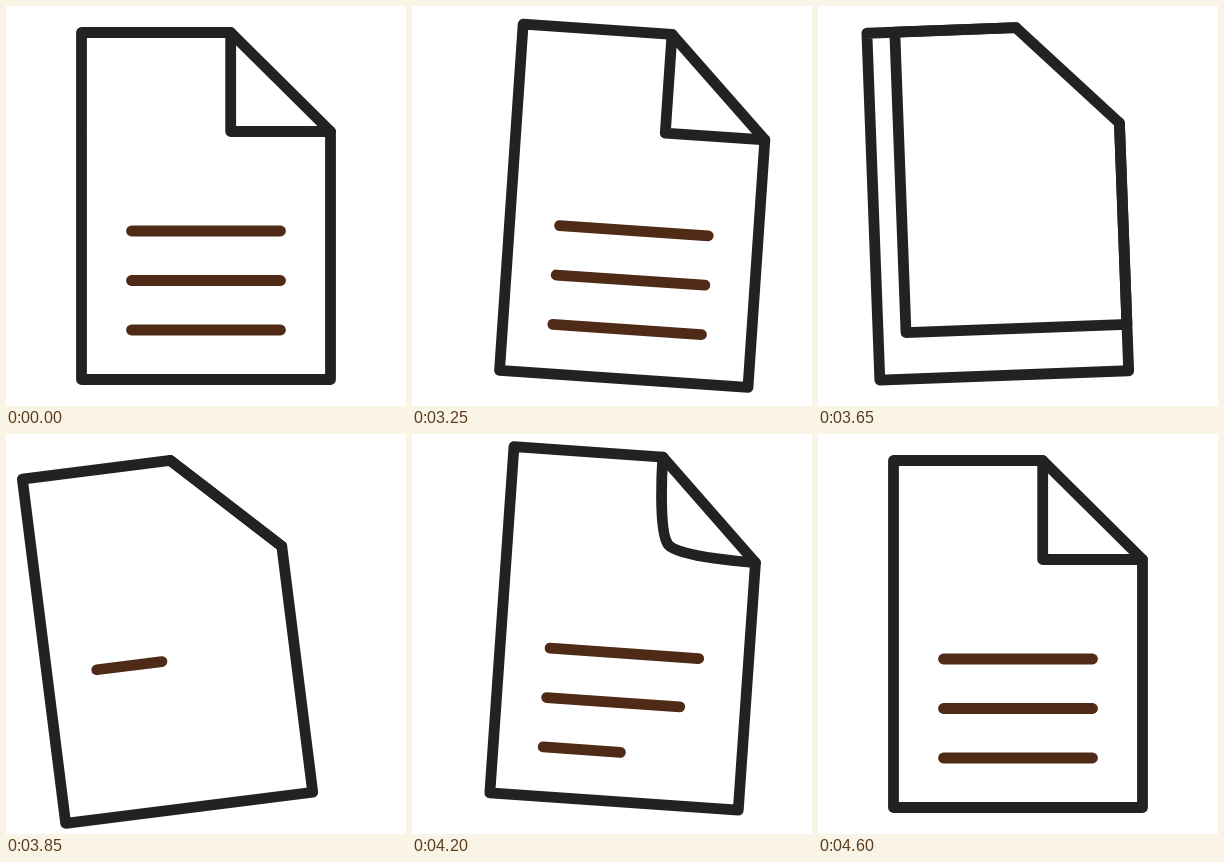
Write an HTML page with a canvas that moves like this. It is 400 px wide and 400 px high and loops after 4620 ms.

```html
<!DOCTYPE html>
<html lang="en">
<head>
<meta charset="utf-8">
<title>Page turn</title>
<style>
  html, body { margin: 0; width: 100%; height: 100%; overflow: hidden; background: #fff; }
  canvas { display: block; }
</style>
</head>
<body>
<canvas id="stage" width="400" height="400"></canvas>
<script>
const ctx = document.getElementById('stage').getContext('2d');
const LOOP = 4620, INK = '#222', BROWN = '#4e2a17';

// Page geometry, relative to the page centre
const L = -124.5, R = 124.5, T = -173.5, B = 173.5;
const FOLD_X = 24.7, FOLD_Y = -74.5;
const FLIP_START = 3420, FLIP_END = 3743;

// Page sway: time, x, y, degrees
const SWAY = [
  [3095, 0, 0, 0],
  [3440, 55, -1.2, 9.1],
  [3650, -20, -4, -2.1],
  [3865, -38.5, 1.7, -7.2],
  [4255, 17, -6, 4.6],
  [4595, 0, 0, 0]
];

const span = (t, from, to) => Math.min(1, Math.max(0, (t - from) / (to - from)));
const easeInOut = s => (1 - Math.cos(Math.PI * s)) / 2;
const easeOut = s => 1 - (1 - s) ** 2;
const mix = (a, b, s) => a + (b - a) * s;

// Slope at a key; flat at turning points and at both ends
function slope(i, c) {
  const p = SWAY[i - 1], k = SWAY[i], n = SWAY[i + 1];
  if (!p || !n || (k[c] - p[c]) * (n[c] - k[c]) <= 0) return 0;
  return (n[c] - p[c]) / (n[0] - p[0]);
}

function sway(t, c) {
  if (t <= SWAY[0][0]) return 0;
  const i = SWAY.findIndex(k => k[0] > t) - 1;
  if (i < 0) return 0;
  const a = SWAY[i], b = SWAY[i + 1], d = b[0] - a[0], s = (t - a[0]) / d;
  return mix(a[c], b[c], s * s * (3 - 2 * s))
    + d * s * (1 - s) * ((1 - s) * slope(i, c) - s * slope(i + 1, c));
}

function polygon(...points) {
  ctx.beginPath();
  for (const [x, y] of points) ctx.lineTo(x, y);
  ctx.closePath();
  ctx.stroke();
}

function drawLines(t) {
  ctx.strokeStyle = BROWN;
  for (let i = 0; i < 3; i++) {
    const start = 3740 + 163 * i;
    const shown = t < FLIP_END ? 1 : easeOut(span(t, start, start + 440));
    if (!shown) continue;
    const y = 25 + 49.5 * i;
    ctx.beginPath();
    ctx.moveTo(-74.5, y);
    ctx.lineTo(-74.5 + 149 * shown, y);
    ctx.stroke();
  }
}

// The folded corner grows until it covers the whole page
function drawTurningFold(t) {
  const s = easeInOut(span(t, FLIP_START, FLIP_END));
  const x = mix(FOLD_X, L, s), y = mix(FOLD_Y, B, s);
  ctx.beginPath();
  ctx.moveTo(FOLD_X, T);
  ctx.lineTo(x, T);
  ctx.lineTo(x, y);
  ctx.lineTo(R, y);
  ctx.lineTo(R, FOLD_Y);
  ctx.fill();
  ctx.stroke();
}

// A new fold bulges out of the diagonal into a square corner
function drawNewFold(t) {
  const s = easeInOut(span(t, 3910, 4340));
  const mx = mix((FOLD_X + R) / 2, FOLD_X, s), my = mix((T + FOLD_Y) / 2, FOLD_Y, s);
  ctx.beginPath();
  ctx.moveTo(FOLD_X, T);
  ctx.bezierCurveTo(FOLD_X, T, FOLD_X, mix(T, FOLD_Y, s), mx, my);
  ctx.bezierCurveTo(mix(R, FOLD_X, s), FOLD_Y, R, FOLD_Y, R, FOLD_Y);
  ctx.stroke();
}

function draw(t) {
  ctx.setTransform(1, 0, 0, 1, 0, 0);
  ctx.fillStyle = '#fff';
  ctx.fillRect(0, 0, 400, 400);
  ctx.translate(200 + sway(t, 1), 200 + sway(t, 2));
  ctx.rotate(sway(t, 3) * Math.PI / 180);
  ctx.lineWidth = 10.8;
  ctx.lineCap = ctx.lineJoin = 'round';

  drawLines(t);
  ctx.strokeStyle = INK;
  (t < FLIP_END ? drawTurningFold : drawNewFold)(t);
  polygon([L, T], [FOLD_X, T], [R, FOLD_Y], [R, B], [L, B]);
}

const begin = performance.now();
function tick() {
  draw((performance.now() - begin) % LOOP);
  requestAnimationFrame(tick);
}
tick();
</script>
</body>
</html>
```
